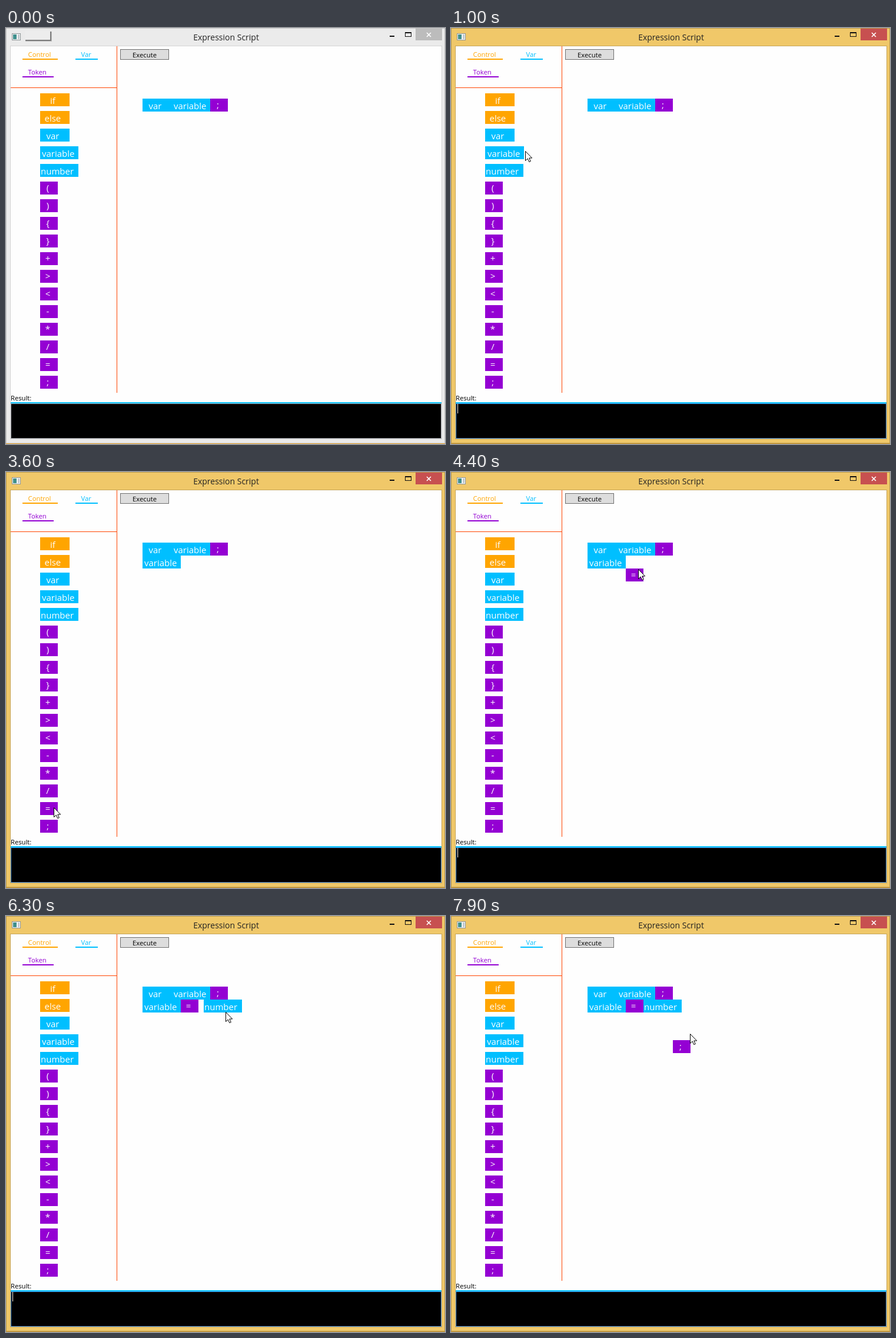
Recreate the animation shown at these times as an HTML page. Size 746 px wide and 707 px high, loop 8000 ms.

```html
<!DOCTYPE html>
<html lang="en">
<head>
<meta charset="utf-8">
<title>Expression Script</title>
<style>
  html, body { margin: 0; width: 100%; height: 100%; overflow: hidden; }
  svg { display: block; width: 746px; height: 707px; }
  text { font-family: "Open Sans", "Noto Sans", sans-serif; white-space: pre; }
  rect { shape-rendering: crispEdges; }
</style>
</head>
<body>
<svg id="stage" viewBox="0 0 746 707"></svg>
<script>
const LOOP = 8000, STEP = 100, ACTIVE_AT = 1000;
const ORANGE = '#ffa500', CYAN = '#00bfff', VIOLET = '#9400d3', RED = '#ff4500';
const stage = document.getElementById('stage');

function add(tag, attrs, parent = stage, content) {
  const node = document.createElementNS('http://www.w3.org/2000/svg', tag);
  for (const key in attrs) node.setAttribute(key, attrs[key]);
  if (content !== undefined) node.textContent = content;
  return parent.appendChild(node);
}
function rect(x, y, width, height, fill, parent) {
  return add('rect', { x, y, width, height, fill }, parent);
}
function frame(x, y, width, height, stroke, fill = 'none') {
  return add('rect', { x: x + .5, y: y + .5, width: width - 1, height: height - 1, stroke, fill });
}
function label(x, y, size, fill, content, parent, anchor = 'start') {
  return add('text', { x, y, 'font-size': size, fill, 'text-anchor': anchor }, parent, content);
}
function show(node, on) {
  node.setAttribute('visibility', on ? 'visible' : 'hidden');
}
function move(node, point) {
  node.setAttribute('transform', `translate(${point.map(Math.round)})`);
}

// name: [width, text inset, colour]
const WORDS = {
  if: [50, 17, ORANGE], else: [50, 7.5, ORANGE], var: [50, 10.5, CYAN],
  variable: [65, 3, CYAN], number: [65, 1, CYAN]
};
const TOOLS = [...Object.keys(WORDS), ...'(){}+><-*/=;'];
const slot = name => [58, 111 + 30 * TOOLS.indexOf(name)];

function block(name, point) {
  const g = add('g', {});
  const [width, inset, color] = WORDS[name] || [30, 13, VIOLET];
  rect(0, 0, width, 22, color, g);
  if (WORDS[name]) label(inset, 18, 15, '#fff', name, g);
  else label(inset, 16, 15, '#fff', name, g, 'middle');
  move(g, point);
  return g;
}

// Window frame
const chrome = rect(0, 0, 746, 707, '');
const outer = frame(0, 0, 746, 706, '');
const ground = rect(0, 706, 746, 1, '');
const inner = frame(7, 30, 734, 669, '', '#fefefe');

// Title bar
frame(10, 9, 15, 12, '#8d9496', '#f4f6f6');
rect(12, 11, 6, 8, '#3f8f8c');
rect(20, 11, 3, 8, '#c3cacf');
label(374, 21, 14, '#222', 'Expression Script', stage, 'middle');
rect(652, 13, 8, 2, '#111');
frame(678, 7, 11, 8, '#111');
rect(678, 7, 11, 2, '#111');
const closeBox = rect(696, 1, 45, 20, '');
add('path', { d: 'M715 8l7 7m0-7l-7 7', stroke: '#fff', 'stroke-width': 1.6 });

// Popup edge left in the title bar
const popup = add('g');
rect(33, 6, 45, 17, '#c4c4c4', popup);
rect(33, 6, 44, 16, '#7c7c7c', popup);
rect(32, 5, 43, 15, '#ededed', popup);

// Category tabs
for (const [name, x, y, width, color] of [
  ['Control', 28, 49, 60, ORANGE], ['Var', 118, 49, 38, CYAN], ['Token', 28, 79, 53, VIOLET]
]) {
  label(x + 9.5, y, 11.3, color, name);
  rect(x, y + 3, width, 2, color);
}
const rule = rect(8, 101, 180, 1, RED);
rect(188, 31, 1, 589, RED);

// Toolbox and work area
for (const name of TOOLS) block(name, slot(name));
frame(194, 36, 83, 18, '#707070', '#dddddd');
label(235.5, 50, 11.3, '#000', 'Execute', stage, 'middle');
block('var', [232, 120]);
block('variable', [282, 120]);
block(';', [347, 120]);

// Result box
label(8, 633, 11.2, '#000', 'Result:');
rect(8, 636, 732, 2, CYAN);
const output = frame(8, 638, 732, 60, '', '#000');
const caret = rect(11, 639, 1, 16, '#fff');

// Each block glides to a spot, then snaps to its place in the row
const drags = [
  { name: 'variable', lift: 960, land: 1700, spot: [232, 142] },
  { name: '=', lift: 3600, land: 4200, spot: [297, 164], snap: 4500, home: [297, 142] },
  { name: 'number', lift: 5400, land: 5900, spot: [336, 142], snap: 6400, home: [327, 142] },
  { name: ';', lift: 7400, land: 7900, spot: [377, 211] }
];
for (const drag of drags) drag.node = block(drag.name, slot(drag.name));

// Pointer stops: time, x, y
const stops = [
  [100, 34, 2], [500, 76, 491], [900, 93, 214], [1000, 126, 209], [1800, 278, 147],
  [2100, 217, 196], [2300, 151, 222], [2400, 151, 222], [3600, 81, 570], [4200, 335, 174],
  [4400, 318, 165], [4800, 318, 159], [4900, 263, 197], [5000, 263, 197], [5400, 95, 244],
  [5900, 379, 180], [6300, 373, 163], [6700, 370, 162], [7300, 83, 603], [7400, 83, 603],
  [7900, 406, 200]
];
const pointer = add('path', {
  d: 'M.5.5V16.5L4.2 13L6.8 18.6L9.3 17.5L6.8 12H11.7Z',
  fill: '#fff', stroke: '#000', 'stroke-linejoin': 'round'
});

function glide(from, to, start, end, t) {
  const k = Math.min(1, Math.max(0, (t - start) / (end - start)));
  const eased = k * k * (3 - 2 * k);
  return from.map((v, i) => v + (to[i] - v) * eased);
}
function pointerAt(t) {
  const i = Math.max(1, stops.findIndex(stop => stop[0] >= t));
  const [start, ...from] = stops[i - 1], [end, ...to] = stops[i];
  return glide(from, to, start, end, t);
}

function render(t) {
  const active = t >= ACTIVE_AT;
  const paint = (node, attr, on, off) => node.setAttribute(attr, active ? on : off);
  paint(chrome, 'fill', '#f0c869', '#ebebeb');
  paint(outer, 'stroke', '#b99a50', '#c8c8c8');
  paint(ground, 'fill', '#c9952f', '#eda52a');
  paint(inner, 'stroke', '#c6a55a', '#d4d4d4');
  paint(closeBox, 'fill', '#c75050', '#bcbcbc');
  paint(output, 'stroke', '#569de5', '#abadb3');
  show(popup, t < 100);
  show(pointer, t >= 100);
  show(caret, active && (t - 940) % 1060 < 530);
  for (const { node, name, lift, land, spot, snap, home } of drags) {
    show(node, t >= lift);
    move(node, t >= snap ? home : glide(slot(name), spot, lift, land, t));
  }
  move(pointer, pointerAt(t));
}

const begin = performance.now();
function tick() {
  const t = (performance.now() - begin) % LOOP;
  render(Math.floor(t / STEP) * STEP);
  requestAnimationFrame(tick);
}
render(0);
requestAnimationFrame(tick);
</script>
</body>
</html>
```
